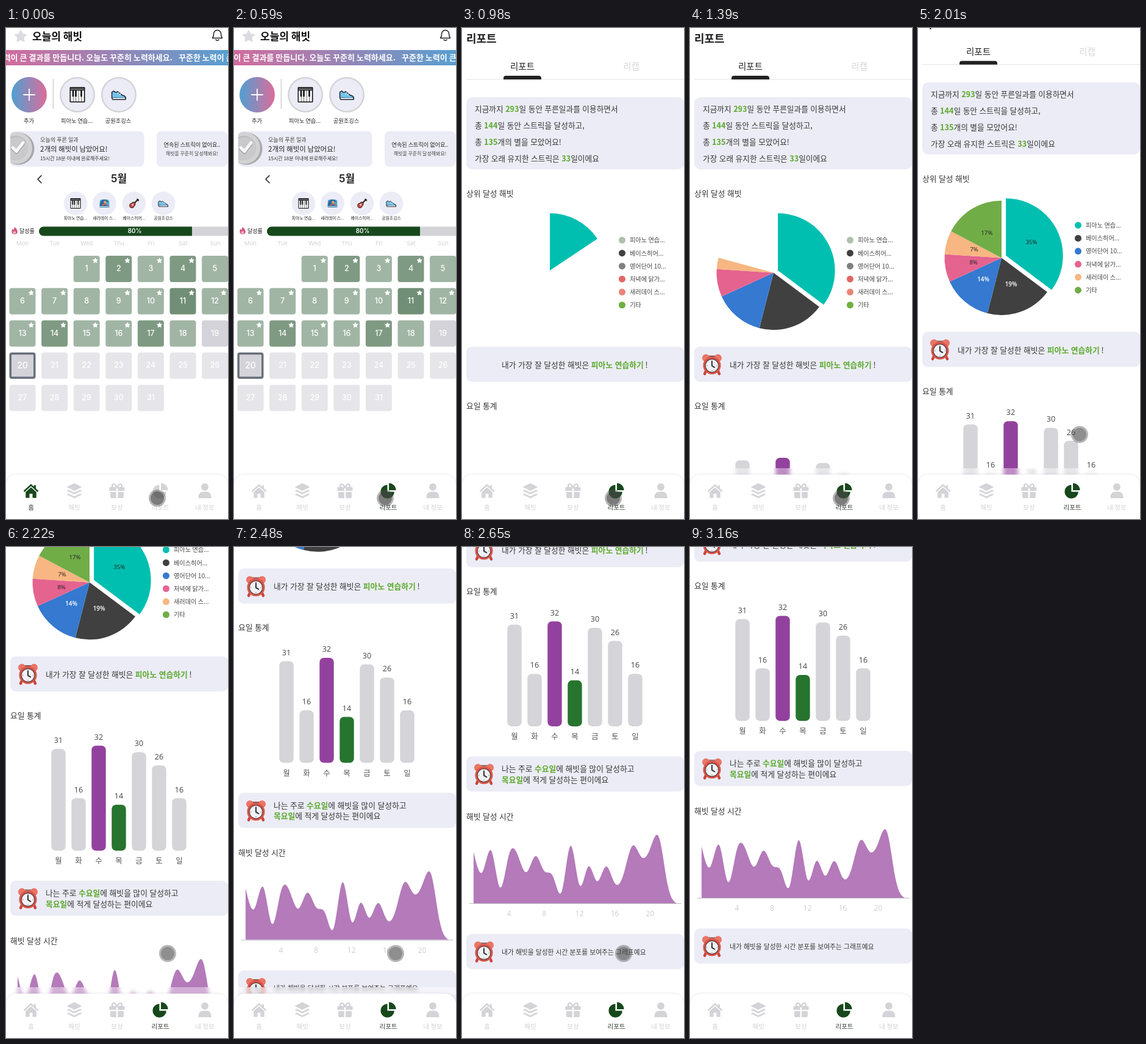
Animation of 364 by 802 pixels, one loop 3230 ms. Source, as an HTML page with a canvas:

```html
<!DOCTYPE html>
<html lang="ko">
<head>
<meta charset="utf-8">
<title>해빗 리포트</title>
<style>
html, body { margin: 0; width: 100%; height: 100%; overflow: hidden; background: #fff; }
canvas { display: block; width: 364px; height: 802px; }
</style>
</head>
<body>
<canvas id="stage"></canvas>
<script>
const W = 364, H = 802, LOOP = 3230;
const NAV_AT = 300, PAGE_AT = 800, GROW_AT = 880, GROW_MS = 645, LABELS_AT = 1640;
const KR = '"Noto Sans CJK KR", "Noto Sans CJK", sans-serif';
const LATIN = 'Inter, "Noto Sans CJK KR", sans-serif';
const REPORT_NUM = '"Open Sans", "Noto Sans", sans-serif';
const GREEN = '#17481c', GRAY = '#d3d3d8', CARD = '#ececf6', ACCENT = '#5aaa2c';

const cv = document.getElementById('stage');
const ctx = cv.getContext('2d');
const dpr = window.devicePixelRatio || 1;
cv.width = W * dpr;
cv.height = H * dpr;

const clamp = v => Math.max(0, Math.min(1, v));
const smooth = v => v * v * (3 - 2 * v);
const rad = deg => (deg - 90) * Math.PI / 180;

function text(str, x, y, size, o = {}) {
  ctx.font = `${o.weight || 400} ${size}px ${o.font || KR}`;
  ctx.textAlign = o.align || 'left';
  ctx.textBaseline = 'middle';
  ctx.fillStyle = o.color || '#222';
  ctx.fillText(str, x, y);
  return ctx.measureText(str).width;
}
const center = (str, x, y, size, o) => text(str, x, y, size, { align: 'center', ...o });

// Parts between asterisks are bold and green.
function rich(str, x, y, size = 12.8) {
  ctx.wordSpacing = '0.6px';
  str.split('*').forEach((part, i) => {
    x += text(part, x, y, size, i % 2 ? { weight: 700, color: ACCENT } : { color: '#363636' });
  });
  ctx.wordSpacing = '0px';
}
function box(x, y, w, h, r, color) {
  ctx.beginPath();
  ctx.roundRect(x, y, w, h, r);
  ctx.fillStyle = color;
  ctx.fill();
}
function disc(x, y, r, color) {
  ctx.beginPath();
  ctx.arc(x, y, r, 0, 7);
  ctx.fillStyle = color;
  ctx.fill();
}
function line(pts, color, width) {
  ctx.beginPath();
  for (let i = 0; i < pts.length; i += 2) ctx.lineTo(pts[i], pts[i + 1]);
  ctx.strokeStyle = color;
  ctx.lineWidth = width;
  ctx.lineCap = ctx.lineJoin = 'round';
  ctx.stroke();
}
function star(x, y, r, color) {
  ctx.beginPath();
  for (let i = 0; i < 10; i++) {
    const k = i % 2 ? r * 0.5 : r, a = rad(i * 36);
    ctx.lineTo(x + k * Math.cos(a), y + k * Math.sin(a));
  }
  ctx.closePath();
  ctx.fillStyle = ctx.strokeStyle = color;
  ctx.lineWidth = r * 0.2;
  ctx.lineJoin = 'round';
  ctx.fill();
  ctx.stroke();
}
// Runs a drawing in a 24-unit square centred on x, y.
function icon(x, y, size, draw) {
  ctx.save();
  ctx.translate(x - size / 2, y - size / 2);
  ctx.scale(size / 24, size / 24);
  draw();
  ctx.restore();
}
function shape(d, color) {
  ctx.fillStyle = color;
  ctx.fill(new Path2D(d));
}

/* Habit pictures */
function piano() {
  box(0, 0, 24, 24, 1, '#151515');
  box(1.5, 2, 21, 2.5, 0, '#6c7076');
  for (let i = 0; i < 5; i++) box(1.5 + i * 4.3, 5.5, 3.7, 17, 0.4, '#fff');
  [4, 8.3, 16.9].forEach(x => box(x, 5, 2.6, 10, 0, '#151515'));
}
function shoe() {
  const d = 'M1 8 L4 6 Q7 10 10 7 L18 13 Q23 14 23 18 L1 17 Z';
  shape(d, '#72c2ea');
  ctx.strokeStyle = '#1c2430';
  ctx.lineWidth = 1.4;
  ctx.stroke(new Path2D(d));
  box(1, 16.5, 22.4, 3.6, 1.5, '#1c2430');
  box(2, 17, 20, 1.6, 0.8, '#fff');
  line([10, 10, 12, 8.5], '#fff', 1);
  line([13, 12, 15, 10.5], '#fff', 1);
}
function wave() {
  box(1, 3, 22, 18, 5, '#4aa5d8');
  shape('M1 14 Q4 2 13 3 Q20 4 21 10 Q15 6 13 11 Q13 17 23 17 V21 H1Z', '#2c6a9c');
  disc(13, 9, 3, '#e8a56c');
  line([8, 16, 13, 12, 18, 15], '#d96b4c', 2.6);
  line([2, 19, 22, 19], '#d8f0fa', 1.5);
}
function guitar() {
  line([11, 13, 21, 3], '#3a2a26', 3);
  line([19.5, 2.5, 22, 5], '#151515', 3);
  disc(7, 17, 6, '#2a1a1a');
  disc(11, 13, 4.5, '#2a1a1a');
  disc(7, 17, 4.6, '#cf4b45');
  disc(11, 13, 3.2, '#cf4b45');
  disc(8.8, 15.2, 2, '#f0e4dc');
}
function alarm(x, y) {
  icon(x, y, 36, () => {
    line([5.5, 19, 4, 22.3], '#c9473d', 3);
    line([18.5, 19, 20, 22.3], '#c9473d', 3);
    line([8, 3, 16, 3], '#8b5a55', 1.4);
    disc(5.4, 5, 4.1, '#ea7565');
    disc(18.6, 5, 4.1, '#ea7565');
    disc(12, 13.2, 9.7, '#d9564a');
    disc(12, 13.4, 7.7, '#6e3f42');
    disc(12, 13.4, 6.8, '#f0f3f6');
    line([12, 8.7, 12, 13.6, 14.8, 15.2], '#34343c', 1.4);
    for (let a = 0; a < 360; a += 90)
      disc(12 + 5.4 * Math.cos(rad(a)), 13.4 + 5.4 * Math.sin(rad(a)), 0.5, '#777');
  });
}

/* Navigation */
const NAV = [
  { x: 41, label: '홈', draw: c => {
    shape('M12 1.2 L.2 12 1.8 13.8 12 4.6 22.2 13.8 23.8 12 19.6 8.1 V3 H16.6 V5.4Z', c);
    shape('M12 6.5 L3.6 14 V23 H9.6 V16.5 H14.4 V23 H20.4 V14Z', c);
  } },
  { x: 112, label: '해빗', draw: c => {
    shape('M12 0 L24 6 12 12 0 6Z', c);
    [0, 6].forEach(d => shape(`M0 ${11.7 + d} L3 ${10.2 + d} 12 ${14.6 + d} 21 ${10.2 + d} 24 ${11.7 + d} 12 ${17.6 + d}Z`, c));
  } },
  { x: 182, label: '보상', draw: c => {
    box(0, 6, 10.8, 6, [1.5, 0, 0, 0], c);
    box(13.2, 6, 10.8, 6, [0, 1.5, 0, 0], c);
    box(1.5, 13.8, 9.3, 9.7, [0, 0, 0, 2], c);
    box(13.2, 13.8, 9.3, 9.7, [0, 0, 2, 0], c);
    ctx.strokeStyle = c;
    ctx.lineWidth = 2.4;
    ctx.stroke(new Path2D('M12 7 Q9 1 6.3 1.6 Q3 3 5.5 6.8 M12 7 Q15 1 17.7 1.6 Q21 3 18.5 6.8'));
  } },
  { x: 253, label: '리포트', draw: c => {
    shape('M10.5 2.6 V13.5 H21.4 A10.7 10.7 0 1 1 10.5 2.6Z', c);
    shape('M13 0 A11 11 0 0 1 24 11 H13Z', c);
  } },
  { x: 326, label: '내 정보', draw: c => {
    disc(12, 6, 5.7, c);
    shape('M1.8 23.5 Q1.8 13.4 9 13.4 H15 Q22.2 13.4 22.2 23.5Z', c);
  } }
];
function nav(active) {
  ctx.save();
  ctx.shadowColor = 'rgba(120,120,140,.22)';
  ctx.shadowBlur = 4 * dpr;
  box(0, 729.5, W, 90, 18, '#fff');
  ctx.restore();
  NAV.forEach((n, i) => {
    const on = i === active;
    icon(n.x, 756, 25, () => n.draw(on ? GREEN : GRAY));
    center(n.label, n.x, 783, 10.6, { weight: 500, color: on ? '#3c443e' : GRAY });
  });
}

/* Home page */
const HABITS = [[114, '피아노 연습...', piano], [161.5, '새러데이 스...', wave],
  [210, '베이스히어...', guitar], [258, '공원조깅스', shoe]];
const STARLESS = [5, 8, 18], MID = [2, 4, 14, 17];

function gradient(x0, x1, a, b) {
  const g = ctx.createLinearGradient(x0, 0, x1, 0);
  g.addColorStop(0, a);
  g.addColorStop(1, b);
  return g;
}
function banner(t) {
  const msg = '꾸준한 노력이 큰 결과를 만듭니다. 오늘도 꾸준히 노력하세요.';
  const o = { weight: 700, color: '#fff' };
  box(0, 36, W, 25, 0, gradient(0, W, '#d16c9d', '#589fd0'));
  const x = 283 - 8 * t / 590;
  const w = text(msg, x, 48.5, 13, o);
  text(msg, x - w - 10, 48.5, 13, o);
}
function habitRing(x, label, draw) {
  disc(x, 109, 29, GRAY);
  disc(x, 109, 26.5, CARD);
  icon(x, 109, 25, draw);
  center(label, x - 1, 152, 9.2);
}
function coin() {
  ctx.save();
  ctx.beginPath();
  ctx.roundRect(7, 169, 219, 58, 8);
  ctx.clip();
  disc(20, 197, 26.5, '#a9a9ad');
  disc(17, 196, 26, '#d2d2d4');
  disc(16, 196, 20, '#b9b9bc');
  disc(17, 197, 19, '#c9c9cb');
  line([11, 197, 17, 203, 28, 189], '#a0a0a4', 5.5);
  line([11, 195.5, 17, 201.5, 28, 187.5], '#f7f7f7', 5);
  ctx.restore();
}
function calendar() {
  ['Mon', 'Tue', 'Wed', 'Thu', 'Fri', 'Sat', 'Sun'].forEach((d, i) =>
    center(d, 27 + 52.65 * i, 352.5, 9.5, { font: LATIN, color: '#d3d3d9' }));
  for (let d = 1; d <= 31; d++) {
    const x = 5.5 + 52.6 * ((d + 1) % 7), y = 372 + 52.7 * Math.floor((d + 1) / 7);
    const fill = d > 20 ? '#e6e6ea' : d > 18 ? '#d3d3d9' : d === 11 ? '#718f76'
      : MID.includes(d) ? '#7f9a83' : '#a1b5a4';
    if (d === 20) {
      box(x, y, 43, 43, 4, '#68707c');
      box(x + 3.5, y + 3.5, 36, 36, 1, fill);
    } else box(x, y, 43, 43, 4, fill);
    center(d, x + 21.5, y + 21.5, d === 20 ? 14 : 12.5, { font: LATIN, weight: 500, color: '#fff' });
    if (d < 19 && !STARLESS.includes(d)) star(x + 35.7, y + 8, 4.2, '#fff');
  }
}
function home(t) {
  star(24, 14, 9.5, '#dcdce0');
  text('오늘의 해빗', 43, 14, 17, { weight: 700, color: '#111' });
  ctx.strokeStyle = '#222';
  ctx.lineWidth = 1.5;
  ctx.lineJoin = 'round';
  ctx.stroke(new Path2D('M338.5 16.5 Q340.5 14 340.5 9.5 A6 6 0 0 1 352.5 9.5 Q352.5 14 354.5 16.5Z M344 19 Q346.5 22 349 19'));
  banner(t);

  disc(38, 109, 29, gradient(9, 67, '#4fa0d2', '#dc6c9a'));
  line([29, 109, 47, 109], '#fff', 1.8);
  line([38, 100, 38, 118], '#fff', 1.8);
  center('추가', 37.5, 152, 9.2);
  line([77.5, 84, 77.5, 131], '#d9d9dd', 2);
  habitRing(117, '피아노 연습...', piano);
  habitRing(185, '공원조깅스', shoe);

  box(7, 168.5, 219.5, 58, 8, CARD);
  coin();
  text('오늘의 푸른 일과', 56, 183, 9.1, { color: '#444' });
  text('2개의 해빗이 남았어요!', 56, 198, 11.5, { weight: 500 });
  text('15시간 18분 이내에 완료해주세요!', 56, 213, 8, { color: '#333' });
  box(247, 168.5, 116, 58, 8, CARD);
  center('연속된 스트릭이 없어요..', 305, 190.5, 9.1, { weight: 500 });
  center('해빗을 꾸준히 달성해봐요!', 305, 204.5, 7.9, { color: '#444' });

  line([58, 241, 52, 247, 58, 253], '#222', 1.6);
  center('5월', 185, 247, 17, { font: LATIN, weight: 600 });
  HABITS.forEach(([x, label, draw]) => {
    disc(x, 286.5, 19.3, CARD);
    icon(x, 286.5, 17, draw);
    center(label, x, 310.5, 6.8);
  });

  shape('M14 325 Q20 330 18.5 335 Q14 339 10 335 Q8.5 331 11 328 L12.5 330Z', '#d8527a');
  disc(14, 334, 2.3, '#f2b8c0');
  text('달성률', 22, 331.5, 9);
  box(54, 324.5, 330, 15, 7.5, GRAY);
  box(54, 324.5, 251, 15, [7.5, 0, 0, 7.5], GREEN);
  center('80%', 211, 332, 9.8, { font: LATIN, weight: 600, color: '#fff' });
  calendar();
}

/* Report page */
const SLICES = [
  [35.2, '#00bfb0', '#b0bfae', '피아노 연습...', '#222'],
  [18.8, '#404040', '#404040', '베이스히어...', '#fff'],
  [14.2, '#3579d0', '#808084', '영어단어 10...', '#fff'],
  [7.8, '#e5638f', '#e06666', '저녁에 닭가...', '#222'],
  [6.7, '#f7b682', '#e88478', '새러데이 스...', '#222'],
  [17.3, '#70ad47', '#70b040', '기타', '#222']
];
const DAYS = [[31, '월'], [16, '화'], [32, '수'], [14, '목'], [30, '금'], [26, '토'], [16, '일']];
const HOURS = [84, 51, 86, 26, 79, 79, 51, 77, 53, 44, 20, 94, 30, 60, 36, 60, 33, 48, 94, 76, 89, 108, 30, 0];

function pie(grow, ready) {
  const end = 360 * grow;
  let from = 0;
  SLICES.forEach(([pct, color, early, name, ink], i) => {
    const to = from + pct * 3.6, mid = rad((from + to) / 2);
    const out = i ? 0 : 8;
    const x = 137 + out * Math.cos(mid), y = 399.7 + out * Math.sin(mid);
    if (end > from) {
      ctx.beginPath();
      ctx.moveTo(x, y);
      ctx.arc(x, y, 93.5, rad(from), rad(Math.min(to, end)));
      ctx.fillStyle = color;
      ctx.fill();
    }
    if (ready) center(Math.round(pct) + '%', x + 46.7 * Math.cos(mid), y + 46.7 * Math.sin(mid), 9.8,
      { font: REPORT_NUM, weight: ink === '#fff' ? 600 : 400, color: ink });
    disc(262.5, 346.5 + 21.2 * i, 5.5, ready ? color : early);
    text(name, 275, 346.5 + 21.2 * i, 10.2, { color: '#444' });
    from = to;
  });
}
function bars(grow, ready) {
  DAYS.forEach(([n, day], i) => {
    const x = 86 + 33 * i, h = n * 5.36 * grow;
    const color = n === 32 ? '#93419e' : n === 14 ? '#27742e' : '#d4d4d9';
    if (h > 0) box(x - 11.7, 838 - h, 23.4, h, Math.min(7, h / 2), color);
    if (ready) center(n, x, 838 - h - 13, 12.5, { font: REPORT_NUM, color: '#444' });
    center(day, x, 854.5, 12.5, { color: '#555' });
  });
}
// Slopes of a natural cubic spline, by relaxation.
function splineSlopes(v) {
  const n = v.length - 1, m = v.map(() => 0);
  for (let pass = 0; pass < 30; pass++) {
    m[0] = (3 * (v[1] - v[0]) - m[1]) / 2;
    for (let i = 1; i < n; i++) m[i] = (3 * (v[i + 1] - v[i - 1]) - m[i - 1] - m[i + 1]) / 4;
    m[n] = (3 * (v[n] - v[n - 1]) - m[n - 1]) / 2;
  }
  return m;
}
const SLOPES = splineSlopes(HOURS);

function area() {
  const left = 19, base = 1127, step = 14.47;
  ctx.beginPath();
  ctx.moveTo(left, base);
  ctx.lineTo(left, base - HOURS[0]);
  for (let i = 0; i < 23; i++) {
    const x = left + step * i, a = base - HOURS[i], b = base - HOURS[i + 1];
    ctx.bezierCurveTo(x + step / 3, a - SLOPES[i] / 3, x + step * 2 / 3, b + SLOPES[i + 1] / 3, x + step, b);
  }
  ctx.closePath();
  ctx.fillStyle = '#b47aba';
  ctx.fill();
  line([12, base + 0.5, 359, base + 0.5], '#b9b9bd', 1);
  for (let h = 4; h <= 20; h += 4)
    center(h, left + step * h, 1145, 12, { font: REPORT_NUM, color: '#cdcdd2' });
}
function tip(y, t) {
  box(7, y, 357, 57.5, 9, CARD);
  if (t > 1130) alarm(36, y + 29);
}
function report(t) {
  const grow = clamp((t - GROW_AT) / GROW_MS), ready = t >= LABELS_AT;
  ctx.save();
  ctx.translate(0, -scrollAt(t));
  text('리포트', 7, 17, 18, { weight: 700 });
  center('리포트', 99, 62.5, 14.5, { weight: 500 });
  center('리캡', 277.5, 62.5, 14.5, { weight: 500, color: '#d6d6da' });
  line([7, 84, W, 84], '#e2e2e6', 1);
  box(68, 78, 62, 6, [4, 4, 0, 0], '#222');

  box(7, 113, 357, 118, 10, CARD);
  ['지금까지 *293*일 동안 푸른일과를 이용하면서', '총 *144*일 동안 스트릭을 달성하고,',
    '총 *135*개의 별을 모았어요!', '가장 오래 유지한 스트릭은 *33*일이에요']
    .forEach((s, i) => rich(s, 21, 132 + 27 * i, 12.7));

  rich('상위 달성 해빗', 7, 270);
  pie(grow, ready);
  tip(520.5, t);
  rich('내가 가장 잘 달성한 해빗은 *피아노 연습하기* !', 65, 550);

  rich('요일 통계', 7, 617);
  bars(grow, ready);
  tip(887, t);
  rich('나는 주로 *수요일*에 해빗을 많이 달성하고', 65, 907.5);
  rich('*목요일*에 적게 달성하는 편이에요', 65, 925);

  rich('해빗 달성 시간', 7, 985);
  area();
  tip(1177, t);
  rich('내가 해빗을 달성한 시간 분포를 보여주는 그래프예요', 65, 1206.5, 10.8);
  ctx.restore();
}

const SCROLL = [[1960, 0], [2010, 23], [2110, 195], [2220, 341], [2340, 424], [2480, 485], [2600, 530], [2710, 554]];
function scrollAt(t) {
  const last = SCROLL.length - 1;
  if (t <= SCROLL[0][0]) return 0;
  if (t >= SCROLL[last][0]) return SCROLL[last][1];
  const i = SCROLL.findIndex(p => p[0] > t) - 1;
  const slope = k => k <= 0 || k >= last ? 0
    : (SCROLL[k + 1][1] - SCROLL[k - 1][1]) / (SCROLL[k + 1][0] - SCROLL[k - 1][0]);
  const [t0, a] = SCROLL[i], [t1, b] = SCROLL[i + 1], d = t1 - t0, u = (t - t0) / d;
  return a + (b - a) * smooth(u) + d * u * (1 - u) * (slope(i) * (1 - u) - slope(i + 1) * u);
}

// Content shows through blurred just above the navigation.
function blurStrip() {
  ctx.save();
  ctx.beginPath();
  ctx.rect(4, 719, W - 8, 12);
  ctx.clip();
  ctx.setTransform(1, 0, 0, 1, 0, 0);
  ctx.filter = `blur(${3 * dpr}px)`;
  ctx.drawImage(cv, 0, 0);
  ctx.restore();
  box(0, 719, W, 12, 0, 'rgba(255,255,255,.4)');
}
function pointer(t) {
  const move = smooth(clamp((t - 1570) / 280)), leave = clamp((t - 2740) / 160);
  if (leave === 1) return;
  const x = 248 + 17 * move + 5 * leave, y = 768 - 104 * move + 5 * leave;
  ctx.globalAlpha = 1 - leave;
  disc(x, y, 14, 'rgba(85,85,85,.42)');
  disc(x, y, 11, `rgba(64,64,64,${0.5 - 0.16 * move})`);
  ctx.globalAlpha = 1;
}

function draw(t) {
  ctx.setTransform(dpr, 0, 0, dpr, 0, 0);
  box(0, 0, W, H, 0, '#fff');
  if (t < PAGE_AT) home(t);
  else {
    report(t);
    blurStrip();
  }
  nav(t < NAV_AT ? 0 : 3);
  pointer(t);
}

const start = performance.now();
function frame() {
  draw((performance.now() - start) % LOOP);
  requestAnimationFrame(frame);
}
frame();
</script>
</body>
</html>
```
